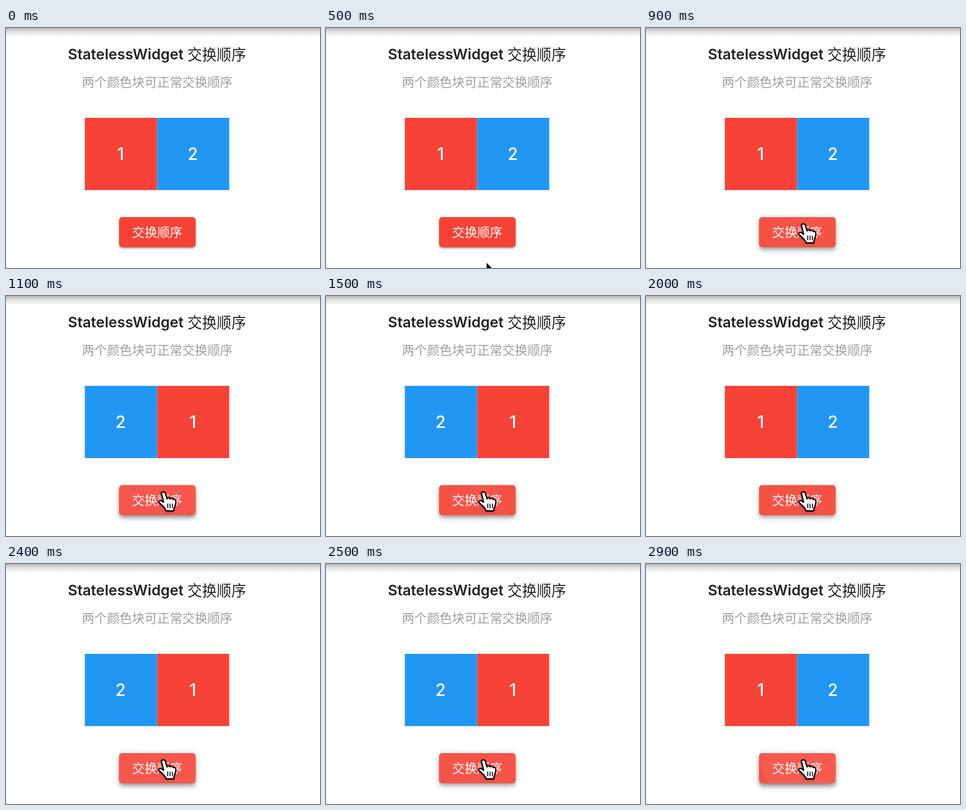
An HTML page that plays this animation: 500x382 px, repeating every 3000 ms.

```html
<!DOCTYPE html>
<html lang="zh">
<head>
<meta charset="utf-8">
<style>
  html, body { margin: 0; width: 100%; height: 100%; overflow: hidden; background: #fff; }
  #stage { position: relative; width: 500px; height: 382px; overflow: hidden; background: #fff; }
  #bar { position: absolute; inset: 0 0 auto; height: 13px;
    background: linear-gradient(#b5b5b5, #d0d0d0 25%, #e6e6e6 55%, #f1f1f1 85%, #f5f5f5); }
  .button, .shadow { position: absolute; left: 179.5px; top: 301px; width: 122px; height: 48px; border-radius: 5px; }
  .button { background: #f44336; overflow: hidden; }
  #rest { box-shadow: 0 4px 1px -3px #0003, 0 3px 3px #00000024, 0 1px 7px #0000001f; }
  #raised { box-shadow: 0 3px 5px -1px #0003, 0 5px 7px #00000024, 0 1px 13px #0000001f; }
  #pressed { box-shadow: 0 5px 7px -2px #0002, 0 7px 9px 1px #00000014; }
  #tint { position: absolute; inset: 0; background: #fff; }
  #ripple { position: absolute; left: 70px; top: 12px; width: 0; height: 0; border-radius: 50%; background: #fff; }
  svg { position: absolute; left: 0; top: 0; }
  text { font-family: Inter, "Noto Sans CJK SC", "Noto Sans CJK", sans-serif; }
  .cjk { font-family: "Noto Sans CJK SC", "Noto Sans CJK", sans-serif; }
  .digit { font-size: 26.5px; font-weight: 500; fill: #fff; text-anchor: middle; }
</style>
</head>
<body>
<div id="stage">
  <div id="bar"></div>
  <div class="shadow" id="rest"></div>
  <div class="shadow" id="raised"></div>
  <div class="shadow" id="pressed"></div>
  <div class="button"><div id="tint"></div><div id="ripple"></div></div>
  <svg width="500" height="382" viewBox="0 0 500 382">
    <text x="98.5" y="50" font-size="23.3" font-weight="600" fill="#212121">StatelessWidget</text>
    <text class="cjk" x="289" y="50.5" font-size="23.3" font-weight="500" fill="#212121">交换顺序</text>
    <text class="cjk" x="120.7" y="93.5" font-size="20" fill="#9e9e9e">两个颜色块可正常交换顺序</text>
    <g id="one">
      <rect x="125.5" y="143" width="115" height="115" fill="#f44336"/>
      <text class="digit" x="182.5" y="210">1</text>
    </g>
    <g id="two">
      <rect x="125.5" y="143" width="115" height="115" fill="#2196f3"/>
      <text class="digit" x="182.5" y="210">2</text>
    </g>
    <text class="cjk" x="200.7" y="332.5" font-size="20" font-weight="500" fill="#fff">交换顺序</text>
    <g id="arrow">
      <path d="M0 0V23L5.3 18L9 26.5L13 24.8L9.3 16.5H16.5Z" fill="#000" stroke="#fff" stroke-width="1.5"/>
    </g>
    <g id="hand" stroke="#000" stroke-linejoin="round" stroke-linecap="round"
       style="filter:drop-shadow(0 1.5px 1.5px #0006)">
      <path fill="#fff" stroke-width="2" d="M-2.5 1C-3 -1.5 2.5 -2.5 3.5 .5L6.5 10C7 7.5 11 7.5 11.5 10
        C12.5 8 15.5 8.5 16 11C17.5 9.5 20.5 11 20.5 14C20.5 20 18.5 22 17.5 25L17 29H5
        C4 24 -2 20 -6.5 15.5C-8 12.5 -3.5 11.5 -1.5 13.5L1 15.5Z"/>
      <path fill="none" stroke-width="1.5" d="M7.5 18V24M11.2 18V24M15 18V24"/>
    </g>
  </svg>
</div>
<script>
  const LOOP = 3000, STEP = 100;
  const SWAPS = [1000, 1600, 2300, 2900];
  const PRESS = 150, RELEASE = 250;
  const ENTER = 500, HOVER = 600, SETTLE = 700;

  const el = id => document.getElementById(id);
  const clamp = v => Math.min(1, Math.max(0, v));
  const place = (id, x, y) => el(id).setAttribute('transform', `translate(${x} ${y})`);
  const show = (id, on) => { el(id).style.display = on ? '' : 'none'; };

  function draw(t) {
    const swapped = SWAPS.filter(s => t >= s).length % 2;
    place('one', swapped ? 115 : 0, 0);
    place('two', swapped ? 0 : 115, 0);

    const move = clamp((t - ENTER) / (SETTLE - ENTER));
    const ease = 1 - (1 - move) ** 2;
    const x = 255 - 5 * ease, y = 372 - 59 * ease;
    const hover = t >= HOVER;
    show('arrow', t >= ENTER && !hover);
    show('hand', hover);
    place('arrow', x, y);
    place('hand', x, y);

    const raise = clamp((t - HOVER + STEP) / 200) * hover;
    el('rest').style.opacity = 1 - raise;
    el('raised').style.opacity = raise;
    el('tint').style.opacity = .08 * raise;

    // The press builds before each swap and fades after it.
    const tap = SWAPS.find(s => t >= s - PRESS && t <= s + RELEASE);
    const age = tap === undefined ? 0 : t - tap;
    const press = tap === undefined ? 0 : age < 0 ? 1 + age / PRESS : 1 - age / RELEASE;
    el('pressed').style.opacity = press;
    const ripple = el('ripple').style;
    const radius = 110 * clamp((age + PRESS) / 250);
    ripple.width = ripple.height = 2 * radius + 'px';
    ripple.margin = `${-radius}px 0 0 ${-radius}px`;
    ripple.opacity = .05 * press;
  }

  const start = performance.now();
  function tick() {
    const t = (performance.now() - start) % LOOP;
    draw(Math.floor(t / STEP) * STEP);
    requestAnimationFrame(tick);
  }
  tick();
</script>
</body>
</html>
```
